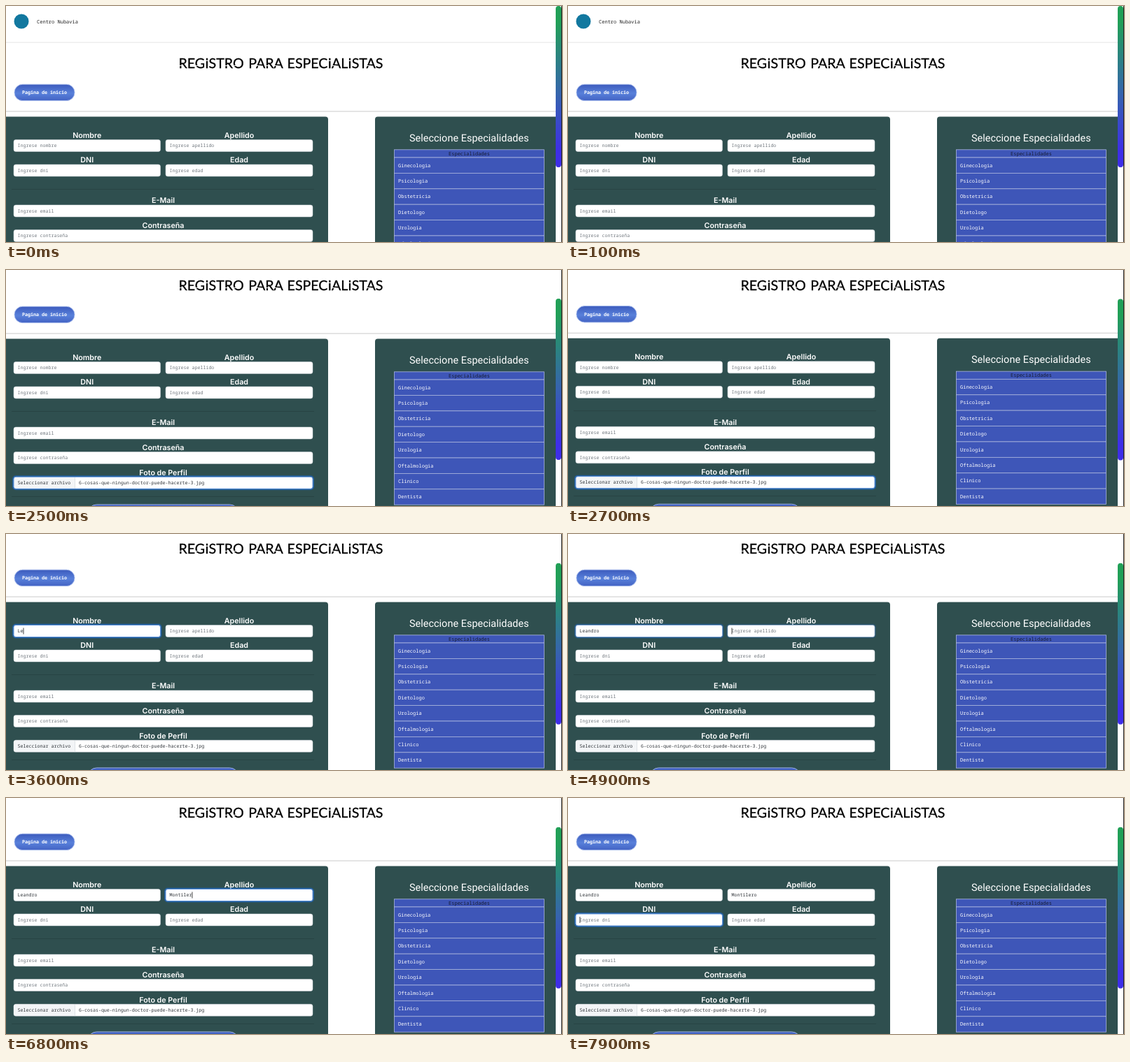
Animation, 794 px wide and 338 px high, one loop 8000 ms. Source, as an HTML page:

```html
<!DOCTYPE html>
<html lang="es">
<head>
<meta charset="utf-8">
<title>Registro para especialistas</title>
<style>
html, body { margin: 0; width: 100%; height: 100%; overflow: hidden; background: #fff; }
svg { display: block; width: 794px; height: 338px; }
text { text-rendering: geometricPrecision; white-space: pre; }
.mono { font: 7.03px "Noto Sans Mono", monospace; }
.field { font: 6.65px "Noto Sans Mono", monospace; fill: #30353a; }
.hint { fill: #737a80; }
.bold { font: 700 6.7px "Noto Sans Mono", monospace; }
.label { font: 600 10.7px Inter, sans-serif; }
.title { font: 19.6px Lato, sans-serif; word-spacing: 1.5px; stroke: #000; stroke-width: .3px; }
.head { font: 14.5px Roboto, sans-serif; }
.mid { text-anchor: middle; }
.white { fill: #fff; }
</style>
</head>
<body>
<svg viewBox="0 0 794 338">
  <defs>
    <linearGradient id="pill" x2="0" y2="1">
      <stop stop-color="#3c5bbd"/><stop offset=".55" stop-color="#5880da"/><stop offset="1" stop-color="#4363c4"/>
    </linearGradient>
    <linearGradient id="thumbFill" x2="0" y2="1">
      <stop offset=".1" stop-color="#21a057"/><stop offset=".55" stop-color="#3664ae"/><stop offset=".9" stop-color="#3e2ee8"/>
    </linearGradient>
  </defs>
  <g id="page"></g>
  <rect x="785" width="9" height="338" fill="#fff"/>
  <rect x="793" width="1" height="338" fill="#222"/>
  <rect id="thumb" x="785" width="8" height="231" rx="4" fill="url(#thumbFill)"/>
  <path id="cursor" transform="translate(146 135)" d="M0 0V14L3.3 11L6 16.5L8 15.5L5.6 10.3H10Z" fill="#fff" stroke="#333" stroke-width=".8"/>
</svg>
<script>
const $ = id => document.getElementById(id);
const rect = (x, y, w, h, fill, extra = '') =>
  `<rect x="${x}" y="${y}" width="${w}" height="${h}" fill="${fill}" ${extra}/>`;
const text = (x, y, cls, s, extra = '') => `<text x="${x}" y="${y}" class="${cls}" ${extra}>${s}</text>`;
const pill = (x, y, w, h) =>
  rect(x, y, w, h, 'url(#pill)', `rx="${h / 2}" stroke="#a9bdec" stroke-width=".9"`);

const CHAR = 3.99;
// id, label, hint, x, y, width, focus start, focus end
const fields = [
  ['name', 'Nombre', 'Ingrese nombre', 11, 191.5, 209.5, 3100, 4900],
  ['last', 'Apellido', 'Ingrese apellido', 228, 191.5, 210, 4900, 7600],
  ['dni', 'DNI', 'Ingrese dni', 11, 227, 209.5, 7600, 9000],
  ['age', 'Edad', 'Ingrese edad', 228, 227, 210],
  ['mail', 'E-Mail', 'Ingrese email', 11, 285, 427],
  ['pass', 'Contraseña', 'Ingrese contraseña', 11, 320.5, 427],
  ['file', 'Foto de Perfil', '', 11, 356.3, 427, -200, 3100]
];
const typing = {
  name: ['Leandro', [3400, 3600, 4000, 4100, 4300, 4400, 4600]],
  // '<' is a backspace
  last: ['Moni<tilero', [5200, 5300, 5500, 5700, 6000, 6200, 6300, 6500, 6700, 6800, 7100]],
  dni: ['', []]
};

const input = ([id, label, hint, x, y, w]) =>
  text(x + w / 2, y - 2.7, 'label mid white', label) +
  rect(x, y, w, 17, '#fff', 'rx="3" stroke="#ced4da" stroke-width=".5"') +
  (id === 'file'
    ? rect(x + .5, y + .5, 87, 16, '#f3f5f7', 'rx="2.5"') + rect(98, y, .6, 17, '#ced4da') +
      text(16.6, y + 10.8, 'field', 'Seleccionar archivo') +
      text(104, y + 10.8, 'field', '6-cosas-que-ningun-doctor-puede-hacerte-3.jpg')
    : text(x + 5.6, y + 10.8, 'field hint', hint, `id="${id}"`)) +
  `<g id="${id}Ring" fill="none" opacity="0">` +
  rect(x - 1, y - 1, w + 2, 19, 'none', 'rx="4" stroke="#0d6efd" stroke-opacity=".4" stroke-width="2"') +
  rect(x, y, w, 17, 'none', 'rx="3" stroke="#5a90dc" stroke-width=".9"') + '</g>' +
  (typing[id] ? rect(x + 5.6, y + 4, .8, 9, '#111', `id="${id}Caret"`) : '');

const specialties = ['Ginecologia', 'Psicologia', 'Obstetricia', 'Dietologo', 'Urologia',
  'Oftalmologia', 'Clinico', 'Dentista'];
const ROW = 22.4;
const cell = (y, h) => rect(554.5, y, 214, h, '#3e56b8', 'stroke="#aab5de" stroke-width=".8"');

$('page').innerHTML =
  '<circle cx="22" cy="22" r="10.5" fill="#12789f"/>' +
  text(44, 24.8, 'mono', 'Centro Nubavia', 'fill="#222"') +
  rect(0, 51.7, 785, .8, '#dedede') +
  text(392.5, 89.2, 'title mid', 'REGISTRO PARA ESPECIALISTAS', 'id="title"') +
  pill(12, 112.2, 86, 23.4) +
  text(55, 126.4, 'bold mid white', 'Pagina de inicio') +
  rect(0, 150.4, 785, 1.1, '#cfcfcf') +
  rect(-6, 158.5, 466, 340, '#2f4f4f', 'rx="4"') +
  rect(527, 158.5, 262, 340, '#2f4f4f', 'rx="4"') +
  rect(8, 262, 432, .8, '#274242') +
  rect(8, 384, 432, .8, '#274242') +
  fields.map(input).join('') +
  pill(117, 395.9, 215, 25) +
  text(661.3, 194, 'head mid white', 'Seleccione Especialidades') +
  cell(205.8, 11.2) +
  text(661.5, 214, 'mono mid', 'Especialidades', 'fill="#161c33"') +
  specialties.map((s, i) => cell(217 + i * ROW, ROW) +
    text(560, 230.6 + i * ROW, 'mono white', s)).join('');

// Stencil cuts in the heading
const title = $('title');
let cuts = '';
[...title.textContent].forEach((c, i) => {
  const { x, width } = title.getExtentOfChar(i);
  if (c === 'I') cuts += rect(x, 77.6, width, 1.2, '#fff');
  else if ('RGSOA'.includes(c)) cuts += rect(x, 85, width / 2, .9, '#fff');
});
title.insertAdjacentHTML('afterend', cuts);

const clamp = v => Math.max(0, Math.min(1, v));

function typed([keys, times], t) {
  let s = '';
  times.forEach((at, i) => {
    if (t >= at) s = keys[i] === '<' ? s.slice(0, -1) : s + keys[i];
  });
  return s;
}

function draw(now) {
  const t = Math.floor(now % 8000 / 100) * 100;
  const scroll = t < 2200 ? 0 : t < 3000 ? 61 - 5 * Math.exp((2200 - t) / 190) : 61;
  $('page').setAttribute('transform', `translate(0 ${-scroll})`);
  $('thumb').setAttribute('y', scroll * .683);
  $('cursor').style.display = t >= 2200 && t < 2300 ? '' : 'none';

  for (const [id, , hint, x, , , start, end] of fields) {
    if (start === undefined) continue;
    const fade = at => clamp((t - at + 50) / 150) * (t >= at);
    $(id + 'Ring').setAttribute('opacity', fade(start) - fade(end));
    if (!typing[id]) continue;
    const s = typed(typing[id], t);
    $(id).textContent = s || hint;
    $(id).classList.toggle('hint', !s);
    const caret = $(id + 'Caret');
    caret.setAttribute('x', x + 5.6 + s.length * CHAR);
    caret.style.display = t >= start && t < end ? '' : 'none';
  }
}

const origin = performance.now();
function tick() {
  draw(performance.now() - origin);
  requestAnimationFrame(tick);
}
tick();
</script>
</body>
</html>
```
